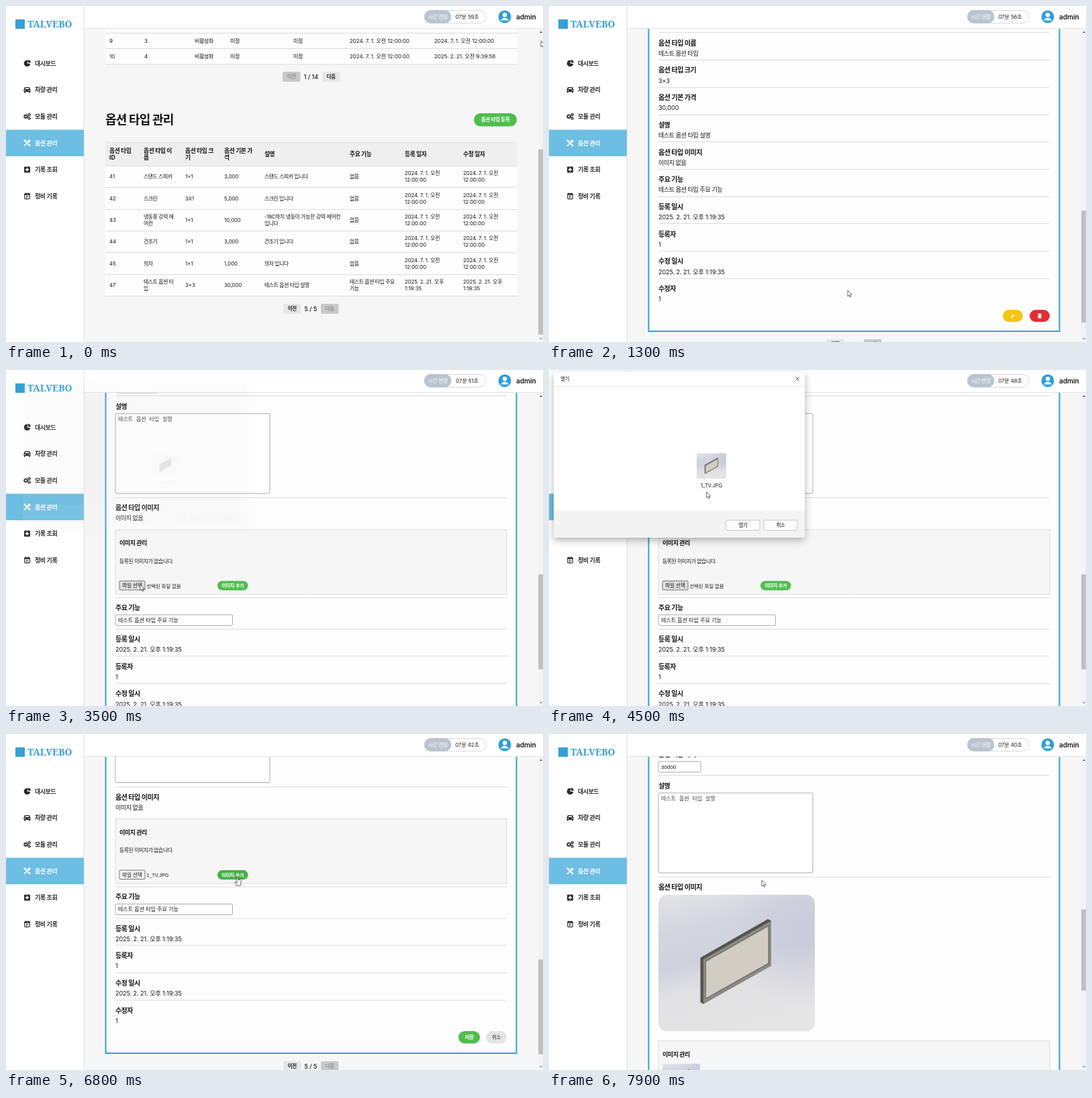
Write an HTML page with a canvas that moves like this. It is 800 px wide and 501 px high and loops after 8 s.

```html
<!DOCTYPE html>
<html lang="ko">
<head>
<meta charset="utf-8">
<title>옵션 관리</title>
<style>
html, body { margin: 0; width: 100%; height: 100%; overflow: hidden; background: #f6f6f6; }
canvas { display: block; width: 800px; height: 501px; }
</style>
</head>
<body>
<canvas id="stage"></canvas>
<script>
const W = 800, H = 501, LOOP = 8000;
const canvas = document.getElementById('stage');
const c = canvas.getContext('2d');
const dpr = window.devicePixelRatio || 1;
canvas.width = W * dpr;
canvas.height = H * dpr;

const SANS = 'Inter, "Noto Sans CJK KR", "Noto Sans CJK", sans-serif';
const FORM = '"Liberation Sans", "Noto Sans CJK KR", sans-serif';
const MONO = '"Noto Sans Mono", "Noto Sans CJK KR", monospace';
const INK = '#151515', LINE = '#dcdcdc', BLUE = '#35a0d6', GREEN = '#4fbd4d';

// ---- timing ----
const EXPAND = 800, EDIT = 1800, DIALOG = 3490, PICKED = 5200, UPLOADED = 7300;
const scrollKeys = [[0, 0], [850, 0], [1250, 476], [2100, 476], [2200, 489], [2900, 618],
  [5600, 618], [6200, 729.5], [7400, 729.5], [7850, 595]];
const cursorKeys = [[0, 797, 52], [100, 797, 52], [650, 445, 424], [1350, 445, 424], [1700, 690, 459],
  [1850, 690, 459], [2150, 679, 415], [2650, 679, 415], [3300, 200, 320], [3900, 200, 320],
  [4700, 241, 156], [5450, 241, 156], [6500, 345, 213], [7300, 345, 213], [7800, 317, 218]];

const clamp = v => Math.max(0, Math.min(1, v));

function track(keys, t) {
  let i = keys.length - 1;
  while (i > 0 && keys[i][0] > t) i--;
  const a = keys[i], b = keys[i + 1] || a;
  const p = b === a ? 0 : (t - a[0]) / (b[0] - a[0]);
  const e = p * p * (3 - 2 * p);
  return a.slice(1).map((v, k) => v + (b[k + 1] - v) * e);
}

// ---- drawing helpers ----
function rect(x, y, w, h, color) {
  c.fillStyle = color;
  c.fillRect(x, y, w, h);
}

function box(x, y, w, h, r, fill, stroke, lw = 1) {
  c.beginPath();
  c.roundRect(x, y, w, h, r);
  if (fill) { c.fillStyle = fill; c.fill(); }
  if (stroke) { c.strokeStyle = stroke; c.lineWidth = lw; c.stroke(); }
}

function poly(points, fill, stroke) {
  c.beginPath();
  points.forEach(([x, y]) => c.lineTo(x, y));
  c.closePath();
  if (fill) { c.fillStyle = fill; c.fill(); }
  if (stroke) { c.strokeStyle = stroke; c.lineWidth = 0.8; c.stroke(); }
}

function disc(x, y, r, color) {
  c.beginPath();
  c.arc(x, y, r, 0, 7);
  c.fillStyle = color;
  c.fill();
}

// y is the visual middle of the line; Hangul is set a little tighter
function text(s, x, y, size = 8, weight = 400, color = INK, align = 'left', family = SANS) {
  const hangul = (s.match(/[가-힣]/g) || []).length;
  c.font = `${weight} ${size}px ${family}`;
  c.letterSpacing = (family === SANS ? -0.06 * size * hangul / s.length : 0) + 'px';
  c.textAlign = align;
  c.fillStyle = color;
  c.fillText(s, x, y + size * 0.36);
}

const rule = y => rect(163, y, 583, 1, LINE);
const label = (s, y) => text(s, 163, y, 10, 700);
const value = (s, y) => text(s, 163, y, 9);

function pill(s, x, y, w, h, fill, color = '#fff', size = 7.5, weight = 600) {
  box(x, y, w, h, h / 2, fill);
  text(s, x + w / 2, y + h / 2, size, weight, color, 'center');
}

function input(s, y, w) {
  box(163, y, w, 16, 2, '#fff', '#aaa');
  text(s, 167, y + 8, 8, 400, INK, 'left', FORM);
}

function pager(y, x, now, prevOn, nextOn) {
  [['이전', x, prevOn], ['다음', x + (prevOn ? 56 : 59), nextOn]].forEach(([s, bx, on]) => {
    box(bx, y - 7.5, 26.5, 15, 2, on ? '#e6e6e6' : '#c9c9c9');
    text(s, bx + 13.2, y, 7.5, 600, on ? '#222' : '#929292', 'center');
  });
  text(now, x + (prevOn ? 41 : 42.5), y, 9, 500, INK, 'center');
}

// ---- page content ----
const COLS = [154, 205, 267, 325, 385, 512, 594, 681];
const HEAD = ['옵션 타입|ID', '옵션 타입 이|름', '옵션 타입 크|기', '옵션 기본 가|격', '설명', '주요 기능', '등록 일자', '수정 일자'];
const DAY = '2024. 7. 1. 오전|12:00:00', LATE = '2025. 2. 21. 오후|1:19:35';
const STAMP = LATE.replace('|', ' ');
const ROWS = [
  ['41', '스탠드 스피커', '1×1', '3,000', '스탠드 스피커 입니다', '없음', DAY, DAY],
  ['42', '스크린', '3X1', '5,000', '스크린 입니다', '없음', DAY, DAY],
  ['43', '냉동용 강력 에|어컨', '1×1', '10,000', '-18C까지 냉동이 가능한 강력 에어컨|입니다', '없음', DAY, DAY],
  ['44', '건조기', '1×1', '3,000', '건조기 입니다', '없음', DAY, DAY],
  ['45', '의자', '1×1', '1,000', '의자 입니다', '없음', DAY, DAY],
  ['47', '테스트 옵션 타|입', '3×3', '30,000', '테스트 옵션 타입 설명', '테스트 옵션 타입 주요|기능', LATE, LATE]
];
const FIELDS = [['옵션 타입 ID', '47'], ['옵션 타입 이름', '테스트 옵션 타입'], ['옵션 타입 크기', '3×3'],
  ['옵션 기본 가격', '30,000'], ['설명', '테스트 옵션 타입 설명'], ['옵션 타입 이미지', '이미지 없음'],
  ['주요 기능', '테스트 옵션 타입 주요 기능'], ['등록 일시', STAMP], ['등록자', '1'], ['수정 일시', STAMP], ['수정자', '1']];

function cells(row, y, size, weight) {
  row.forEach((s, i) => {
    const parts = s.split('|');
    parts.forEach((p, k) => text(p, COLS[i], y + (k - (parts.length - 1) / 2) * 10, size, weight));
  });
}

function tables() {
  rect(148, 0, 613, 87, '#fdfdfd');
  [40, 63, 86.5].forEach(y => rect(148, y, 613, 1, LINE));
  const top = [['9', '3', '2024. 7. 1. 오전 12:00:00'], ['10', '4', '2025. 2. 21. 오전 9:39:58']];
  top.forEach(([id, kind, date], i) => {
    const y = 52 + i * 23.5;
    text(id, 154, y);
    text(kind, 206, y);
    text('비활성화', 281, y);
    text('미정', 334, y);
    text('미정', 428, y);
    text('2024. 7. 1. 오전 12:00:00', 512, y);
    text(date, 638, y);
  });
  pager(105.5, 412, '1 / 14', false, true);

  text('옵션 타입 관리', 148, 170, 18, 700);
  pill('옵션 타입 등록', 697, 160, 64, 19.5, GREEN);
  rect(148, 203, 613, 35, '#efefef');
  rect(148, 203, 613, 1, '#e2e2e2');
  cells(HEAD, 220.5, 8.8, 700);
  rect(148, 238, 613, 194, '#fdfdfd');
  rect(148, 238, 613, 1, LINE);
  ROWS.forEach((r, i) => {
    cells(r, 254.5 + i * 32.35, 7.8, 400);
    rect(148, Math.round(270.4 + i * 32.35), 613, 1, LINE);
  });
}

function frame(bottom) {
  box(148.5, 433, 612, bottom - 433, 0, '#fdfdfd', BLUE, 2);
}

function details() {
  frame(961);
  FIELDS.forEach(([k, v], i) => {
    const y = 490.4 + i * 40.72;
    label(k, y);
    value(v, y + 15.5);
    if (i < FIELDS.length - 1) rule(Math.round(y + 25));
  });
  box(676, 929, 30, 18, 9, '#f7c315');
  box(716, 929, 30, 18, 9, '#df2f35');
  poly([[688, 941], [688.4, 939], [692.2, 935.2], [693.8, 936.8], [690, 940.6]], '#fff');
  rect(728, 935, 6, 1, '#fff');
  rect(730, 934.2, 2, 1, '#fff');
  rect(728.6, 936.6, 4.8, 5, '#fff');
}

function render3d(x, y, w) {
  const k = w / 233;
  c.save();
  c.translate(x, y);
  c.scale(k, k);
  c.beginPath();
  c.roundRect(0, 0, 233, 204, 13);
  c.clip();
  const g = c.createLinearGradient(30, 0, 75, 204);
  [[0, '#e2e2e5'], [0.25, '#d4d6df'], [0.5, '#cfd1dc'], [0.68, '#e0dfe2'], [1, '#e6e5e5']]
    .forEach(([p, col]) => g.addColorStop(p, col));
  rect(0, 0, 233, 204, g);
  const glow = c.createRadialGradient(215, 55, 5, 215, 55, 110);
  glow.addColorStop(0, 'rgba(199,203,218,.9)');
  glow.addColorStop(1, 'rgba(199,203,218,0)');
  rect(0, 0, 233, 204, glow);
  poly([[62.5, 94], [163, 36.5], [168, 39], [168, 106], [67, 163], [62.5, 160.5]], '#55554f');
  poly([[67, 96.5], [168, 39], [168, 106], [67, 163]], '#8b8a84');
  poly([[70, 99], [165, 45], [165, 103], [70, 156]], '#6d6c66');
  poly([[71, 100], [163.5, 47.5], [163.5, 102], [71, 154]], '#d1cdc3');
  c.restore();
}

function editor(t) {
  const done = t >= UPLOADED, picked = t >= PICKED;
  const grow = done ? 196.5 : 0, more = done ? 70 : 0;
  frame(1205.5 + grow + more);
  label('옵션 타입 ID', 490.4);
  value('47', 506);
  rule(515);
  [['옵션 타입 이름', '테스트 옵션 타입', 119], ['옵션 타입 크기', '3x3', 63], ['옵션 기본 가격', '30000', 63]]
    .forEach(([k, v, w], i) => {
      const y = 531 + i * 47;
      label(k, y);
      input(v, y + 11, w);
      rule(y + 31);
    });
  label('설명', 672);
  box(163, 683, 230, 119, 2, '#fff', '#aaa');
  text('테스트 옵션 타입 설명', 167, 691, 8, 400, '#444', 'left', MONO);
  rule(808);
  label('옵션 타입 이미지', 823.5);
  if (done) render3d(163, 834.5, 233);
  else value('이미지 없음', 839);

  c.save();
  c.translate(0, grow);
  box(163, 856, 583, 96.5 + more, 0, '#f6f6f6', LINE);
  text('이미지 관리', 169, 876, 9, 700);
  if (done) render3d(169, 890, 56);
  else text('등록된 이미지가 없습니다.', 169, 903, 7.8);
  c.translate(0, more);
  box(169, 932.5, 38, 13.5, 1, t > 3200 && t < PICKED ? '#dedede' : '#efefef', '#777');
  text('파일 선택', 188, 939.5, 7.5, 400, INK, 'center', FORM);
  text(picked && !done ? '1_TV.JPG' : '선택된 파일 없음', 209.5, 940, 7.3, 400, INK, 'left', FORM);
  pill('이미지 추가', 315, 932.5, 45.5, 14, t > 6450 && t < UPLOADED ? '#47b045' : GREEN, '#fff', 7.3);
  rule(957);
  label('주요 기능', 972);
  input('테스트 옵션 타입 주요 기능', 983, 174.5);
  rule(1004);
  FIELDS.slice(7).forEach(([k, v], i) => {
    const y = 1019.4 + i * 40.72;
    label(k, y);
    value(v, y + 15.5);
    if (i < 3) rule(Math.round(y + 25));
  });
  pill('저장', 674, 1172.5, 32, 18.5, GREEN);
  pill('취소', 715, 1172.5, 31, 18.5, '#e4e4e4', '#333', 7.5, 500);
  c.restore();
  return 773.5 + grow + more;
}

// ---- fixed chrome ----
const ICONS = [
  (x, y, k) => {
    disc(x, y, 4.8, k);
    c.beginPath(); c.moveTo(x, y); c.lineTo(x + 1, y - 6); c.lineTo(x + 6, y - 6); c.lineTo(x + 6, y + 1);
    c.fillStyle = '#fff'; c.fill();
    c.beginPath(); c.moveTo(x + 1.2, y - 1); c.arc(x + 1.2, y - 1, 4.2, -1.57, 0); c.fillStyle = k; c.fill();
  },
  (x, y, k) => {
    poly([[x - 3.5, y - 4], [x + 3.5, y - 4], [x + 5, y], [x - 5, y]], k);
    rect(x - 2.6, y - 2.8, 5.2, 2, '#fff');
    box(x - 5, y - 1, 10, 4, 1, k);
    rect(x - 4.6, y + 2, 2, 2.4, k);
    rect(x + 2.6, y + 2, 2, 2.4, k);
    disc(x - 3, y + 0.8, 0.8, '#fff');
    disc(x + 3, y + 0.8, 0.8, '#fff');
  },
  (x, y, k) => [[-2, 0, 3], [3, -2.7, 2], [3, 2.7, 2]].forEach(([dx, dy, r]) => {
    c.setLineDash([1, 0.8]);
    c.beginPath(); c.arc(x + dx, y + dy, r, 0, 7); c.strokeStyle = k; c.lineWidth = 1.2; c.stroke();
    c.setLineDash([]);
    disc(x + dx, y + dy, r - 0.3, k);
    disc(x + dx, y + dy, r * 0.4, '#fff');
  }),
  (x, y, k) => {
    c.strokeStyle = k; c.lineCap = 'round';
    [[-1, 1.6], [1, 2.2]].forEach(([d, w]) => {
      c.beginPath(); c.moveTo(x - 3.8 * d, y - 3.8); c.lineTo(x + 3.8 * d, y + 3.8); c.lineWidth = w; c.stroke();
    });
    disc(x + 3, y - 3, 2, k);
    disc(x - 3.5, y - 3.5, 1.5, k);
    c.lineCap = 'butt';
  },
  (x, y, k) => {
    box(x - 4.5, y - 4.5, 9, 9, 1, k);
    rect(x - 2.8, y - 0.8, 5.6, 1.6, '#fff');
    rect(x - 0.8, y - 2.8, 1.6, 5.6, '#fff');
  },
  (x, y, k) => {
    box(x - 3.8, y - 3.5, 7.6, 7.6, 1, null, k, 1.1);
    rect(x - 4, y - 4, 8, 2.4, k);
    rect(x - 2.6, y - 5, 1.2, 1.5, k);
    rect(x + 1.4, y - 5, 1.2, 1.5, k);
    rect(x - 2, y - 0.3, 4, 1, k);
    rect(x - 2, y + 1.5, 2.6, 1, k);
  }
];
const MENU = ['대시보드', '차량 관리', '모듈 관리', '옵션 관리', '기록 조회', '정비 기록'];

function chrome(t) {
  rect(116, 0, 684, 33, '#fff');
  rect(116, 33, 684, 1, '#e3e3e3');
  rect(0, 0, 116, H, '#fff');
  rect(115.5, 0, 1, H, '#e0e0e0');
  box(14, 20, 14, 14, 0, BLUE);
  text('TALVEBO', 32, 27, 14, 700, BLUE, 'left', '"Noto Serif", serif');
  rect(0, 184.5, 116, 39.5, '#6cbee3');
  MENU.forEach((s, i) => {
    const y = 85.5 + i * 39.6, color = i === 3 ? '#fff' : '#2b2b2b';
    ICONS[i](31.5, y, color);
    text(s, 43, y, 9, 600, color);
  });

  box(623.5, 6.5, 91.5, 19, 9.5, '#fff', '#d5d9de');
  pill('시간 연장', 623, 6, 40.5, 20, '#b9c4d0', '#fff', 7.8, 500);
  const left = 59 - Math.floor(t / 400 + 0.1);
  text(`07분 ${left}초`, 687, 16, 8, 400, '#222', 'center');
  disc(743, 16, 9.5, '#2f9fd3');
  disc(743, 13.2, 3.2, '#fff');
  c.beginPath();
  c.ellipse(743, 21.5, 5.6, 3.7, 0, Math.PI, 0);
  c.fillStyle = '#fff';
  c.fill();
  text('admin', 760, 16, 10, 600);
}

function scrollbar(scroll, extra) {
  const page = 811 + extra, run = 447;
  rect(793, 34, 7, H - 34, '#f3f3f3');
  box(793, 43 + (scroll + 310) / page * run, 7, H / page * run, 0, '#c0c0c0');
  poly([[795, 40], [799, 40], [797, 37.5]], '#555');
  poly([[795, 495], [799, 495], [797, 497.5]], '#888');
}

function dialog(t) {
  const a = Math.min(clamp((t - DIALOG) / 200), clamp((PICKED + 100 - t) / 100));
  if (a <= 0) return;
  const k = 0.9 + 0.1 * a;
  c.save();
  c.globalAlpha = a;
  c.translate(194, 127);
  c.scale(k, k);
  c.translate(-194, -127);
  c.shadowColor = 'rgba(0,0,0,.3)';
  c.shadowBlur = 12;
  c.shadowOffsetY = 4;
  box(7, 3, 374, 247, 4, '#fff');
  c.shadowColor = 'transparent';
  text('열기', 17, 13, 7.5);
  c.strokeStyle = '#444';
  c.lineWidth = 0.8;
  c.beginPath();
  c.moveTo(367, 10); c.lineTo(373, 16); c.moveTo(373, 10); c.lineTo(367, 16);
  c.stroke();
  rect(7, 24, 374, 1, '#e6e6e6');
  rect(7, 210, 374, 40, '#f3f3f3');
  if (t > 4700) box(212, 118, 60, 62, 2, '#d5e9f8');
  render3d(220, 124, 44);
  text('1_TV.JPG', 242, 172, 7.5, 400, INK, 'center');
  [['열기', 264], ['취소', 320]].forEach(([s, x]) => {
    box(x, 224, 50, 15, 2, '#fdfdfd', '#c8c8c8');
    text(s, x + 25, 231.5, 7.5, 400, INK, 'center');
  });
  c.restore();
}

function cursor(t) {
  const [x, y] = track(cursorKeys, t);
  c.save();
  c.translate(x, y);
  if (t >= PICKED + 100 && t < 5750) {
    c.strokeStyle = '#222';
    c.lineWidth = 1;
    c.beginPath();
    c.moveTo(-2.5, -4.5); c.lineTo(2.5, -4.5);
    c.moveTo(0, -4.5); c.lineTo(0, 4.5);
    c.moveTo(-2.5, 4.5); c.lineTo(2.5, 4.5);
    c.stroke();
  } else if ((t > 1650 && t < 1950) || (t > 6450 && t < UPLOADED)) {
    poly([[-1, 0], [0.8, 0], [1, 4], [4.5, 5], [5.5, 6.5], [4.5, 11], [4, 13], [-1.2, 13], [-4, 8.5], [-3.4, 7.4], [-1, 9]], '#fff', '#333');
  } else {
    poly([[0, 0], [0, 9], [2, 7.2], [3.4, 10.3], [4.8, 9.7], [3.4, 6.7], [6.2, 6.5]], '#fff', '#444');
  }
  c.restore();
}

function draw(t) {
  c.setTransform(dpr, 0, 0, dpr, 0, 0);
  rect(0, 0, W, H, '#f6f6f6');
  const [scroll] = track(scrollKeys, t);
  let extra = 0;
  c.save();
  c.translate(0, -scroll);
  tables();
  if (t >= EDIT) extra = editor(t);
  else if (t >= EXPAND) { details(); extra = 529; }
  pager(451.5 + extra, 413, '5 / 5', true, false);
  c.restore();
  scrollbar(scroll, extra);
  chrome(t);
  dialog(t);
  cursor(t);
}

const start = performance.now();
function tick() {
  const t = (performance.now() - start) % LOOP;
  draw(Math.floor(t / 100) * 100);
  requestAnimationFrame(tick);
}
tick();
</script>
</body>
</html>
```
